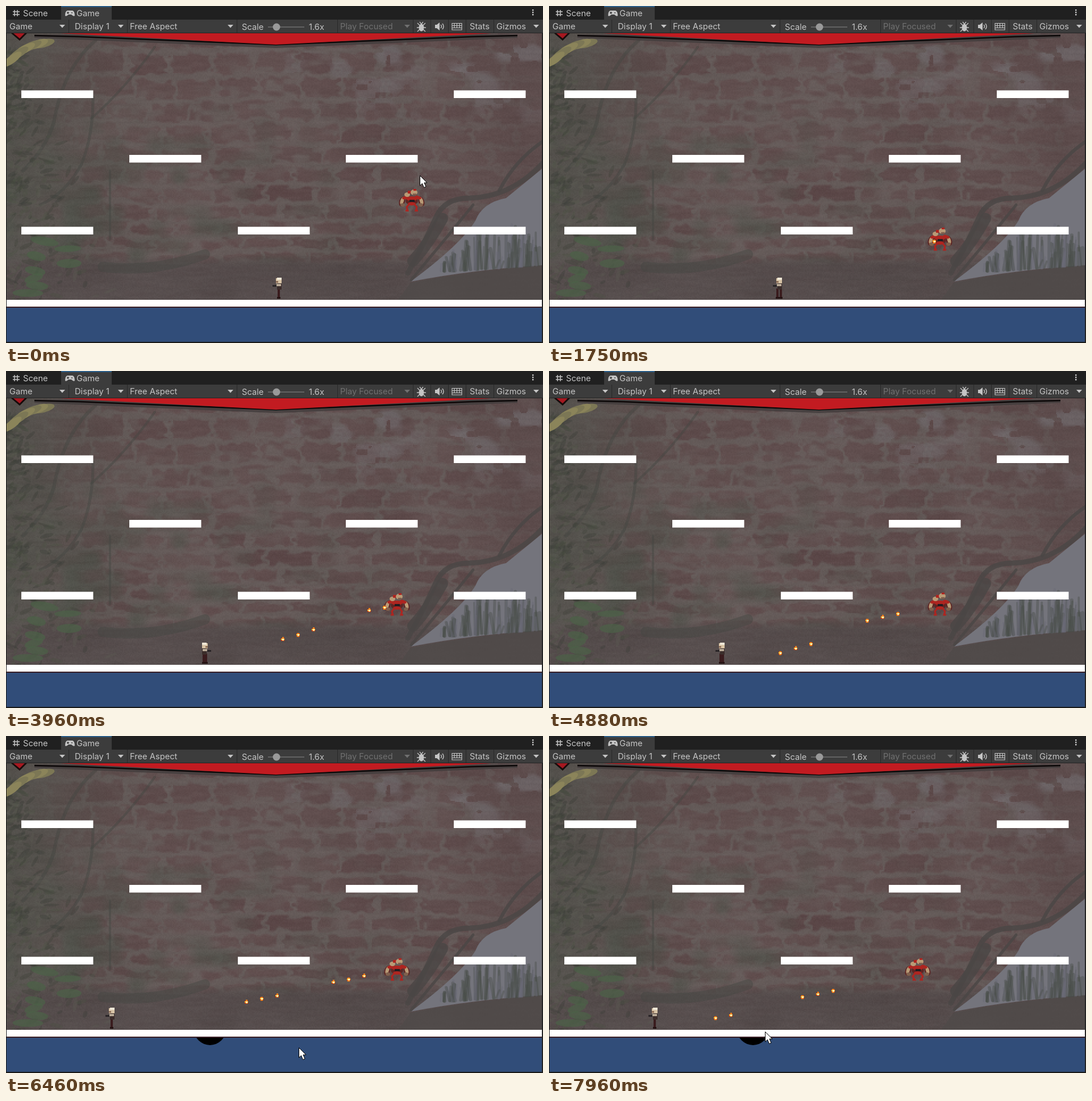
These frames come from a looping animation (945x593 px, 8 s). An HTML page with a canvas:

```html
<!DOCTYPE html>
<html lang="en">
<head>
<meta charset="utf-8">
<title>Game view</title>
<style>
html, body { margin: 0; width: 100%; height: 100%; overflow: hidden; background: #202020; }
canvas { display: block; }
</style>
</head>
<body>
<canvas id="stage" width="945" height="593"></canvas>
<script>
const LOOP = 8000, TOP = 48, W = 945, H = 593, SIDES = [-1, 1];
const stage = document.getElementById('stage').getContext('2d');
const clamp = (v, a = 0, b = 1) => Math.min(b, Math.max(a, v));
const mix = (a, b, k) => a + (b - a) * k;
const mixColor = (a, b, k) => a.map((v, i) => mix(v, b[i], k));

function makeCanvas(w, h) {
  const c = document.createElement('canvas');
  c.width = w; c.height = h;
  return c;
}
function hash(x, y) {
  let h = Math.imul(x, 374761393) + Math.imul(y, 668265263) | 0;
  h = Math.imul(h ^ h >>> 13, 1274126177);
  return ((h ^ h >>> 16) >>> 0) / 4294967296;
}
function noise(x, y) {
  const ix = Math.floor(x), iy = Math.floor(y);
  const ease = k => k * k * (3 - 2 * k), fx = ease(x - ix), fy = ease(y - iy);
  return mix(mix(hash(ix, iy), hash(ix + 1, iy), fx),
             mix(hash(ix, iy + 1), hash(ix + 1, iy + 1), fx), fy);
}
let seed = 7;
const random = (a = 0, b = 1) => mix(a, b, hash(seed++, 91));

function rect(g, color, x, y, w, h) {
  g.fillStyle = color;
  g.fillRect(x, y, w, h);
}
function fill(g, color, d) {
  g.fillStyle = color;
  g.fill(new Path2D(d));
}
function stroke(g, color, width, d) {
  g.strokeStyle = color;
  g.lineWidth = width;
  g.stroke(new Path2D(d));
}
function oval(g, color, x, y, rx, ry, angle = 0) {
  g.fillStyle = color;
  g.beginPath();
  g.ellipse(x, y, rx, ry, angle, 0, Math.PI * 2);
  g.fill();
}

// Courses get flatter towards the floor: top of course n = 30 + 48n - 1.05n²
const courseAt = y => (48 - Math.sqrt(48 * 48 - 4.2 * (y - 30))) / 2.1;

function wallColor(x, y) {
  const wx = x + (noise(x / 9, y / 8) - .5) * 18;
  const wy = y + (noise(x / 12 + 40, y / 7) - .5) * 10 + (noise(x / 90, 3) - .5) * 10;
  const dirt = noise(x / 75 + 9, y / 65), patch = noise(x / 16 + 80, y / 11);
  const left = clamp((330 - x) / 330), right = clamp((x - 720) / 200);
  let color = mixColor([96, 83, 82], [84, 82, 77], left);
  color = mixColor(color, [93, 77, 77], right);

  const course = courseAt(wy), row = Math.floor(course);
  const height = 48 - 1.05 * (2 * row + 1), width = 72 + 26 * hash(row, 5);
  const across = (wx + hash(row, 8) * 90) / width, cell = Math.floor(across);
  const fromEdge = (k, size) => Math.min(k, 1 - k) * size;
  const edge = Math.min(fromEdge(course - row, height), fromEdge(across - cell, width));
  const brick = mixColor([98, 78, 78], [91, 69, 70], hash(cell, row));
  const worn = clamp((patch - .5) * 3) * clamp(dirt * 1.8 - .4);
  const bricks = clamp((x - 25) / 200, .1) * clamp((980 - x) / 220) * clamp(1.3 - dirt * .7) * .75;
  const joint = clamp((6 + patch * 4 - edge) / 5);
  color = mixColor(color, mixColor(brick, [103, 94, 92], Math.max(joint, worn)), bricks);

  const green = clamp((noise(x / 38 + 31, y / 30 + 6) - .42) * 2) * clamp((760 - x) / 450) * clamp((y - 130) / 200);
  color = mixColor(color, [76, 80, 72], green * .7);
  const chalk = clamp((noise(x / 42 + 3, y / 28 + 5) - .58) * 5) * clamp((x - 380) / 300) * clamp((230 - y) / 110);
  if (patch > .42) color = mixColor(color, [114, 108, 111], chalk * .65);
  color = mixColor(color, [84, 75, 75], clamp((y - 438) / 18) * .9);
  const tone = (dirt - .5) * 7 + (noise(x / 28, y / 4) - .5) * 5 + (hash(x, y) - .5) * 5;
  return color.map(v => v + tone);
}

function paintWall(g) {
  const w = 473, h = 242, small = makeCanvas(w, h), s = small.getContext('2d');
  const image = s.createImageData(w, h);
  for (let y = 0, i = 0; y < h; y++)
    for (let x = 0; x < w; x++, i += 4) {
      image.data.set(wallColor(x * 2, y * 2 + TOP), i);
      image.data[i + 3] = 255;
    }
  s.putImageData(image, 0, 0);
  g.imageSmoothingEnabled = false;
  g.drawImage(small, 0, TOP, w * 2, h * 2);
}

function paintPlants(g) {
  g.save();
  g.beginPath();
  g.rect(0, TOP, W, 482);
  g.clip();
  g.lineCap = g.lineJoin = 'round';

  // clearing with hanging grass, lower right
  fill(g, '#74747c', 'M945 285 L880 338 Q838 346 826 378 Q800 420 712 485 Q820 464 945 456Z');
  for (let i = 0; i < 110; i++) {
    const x = random(760, 942), base = 470 - (x - 712) * .06;
    const tint = i % 3 ? '72,78,72' : '104,105,118';
    stroke(g, `rgba(${tint},.4)`, random(2, 7), `M${x} ${base} l${random(-6, 6)} ${-random(10, clamp((x - 750) * .9, 12, 75))}`);
  }
  fill(g, 'rgba(79,74,73,.8)', 'M712 487 Q820 466 945 457 V517 H690Z');
  const bark = 'rgba(74,71,69,.8)';
  stroke(g, bark, 6, 'M945 238 Q895 272 868 325');
  stroke(g, bark, 9, 'M945 276 Q890 336 815 338 Q772 338 757 371 Q735 420 707 470');
  stroke(g, bark, 20, 'M768 374 Q744 418 716 449');
  stroke(g, bark, 5, 'M822 350 Q790 390 713 482');

  // vines and low branch
  const vine = 'rgba(68,69,64,.45)';
  stroke(g, vine, 6, 'M158 60 Q105 105 87 190 Q80 240 30 290');
  stroke(g, vine, 5, 'M153 160 Q154 225 133 278 Q105 330 60 350');
  stroke(g, vine, 4, 'M262 72 Q210 145 150 198 M183 290 V410');
  stroke(g, vine, 18, 'M170 459 Q260 470 350 437');

  const tints = ['62,66,58', '76,83,69', '57,60,54', '91,93,82'];
  for (let i = 0; i < 300; i++) {
    const y = random(75, 525), reach = 35 + clamp((y - 90) / 360) * 145;
    oval(g, `rgba(${tints[i % 4]},.35)`, reach * random() * random(.3, 1.1), y, random(4, 14), random(2, 4), random(-1.4, .6));
  }
  for (let i = 0; i < 8; i++)
    oval(g, 'rgba(76,97,72,.7)', random(35, 155), 414 + i * 13, random(15, 28), random(5, 8), random(-.4, .3));
  for (let i = 0; i < 6; i++)
    oval(g, i % 2 ? '#8b845a' : '#7c7755', 66 - i * 11, 66 + i * i * 1.1, 20, 7, -.25 - i * .08);
  g.restore();
}

function paintHud(g) {
  fill(g, 'rgba(68,62,62,.85)', 'M50 50 H900 V56 L475 74 50 56Z');
  stroke(g, '#0c0808', 2.5, 'M50 52 L130 54 475 68 820 54 900 52');
  fill(g, '#c21b21', 'M95 48 H855 L475 68Z');
  fill(g, '#170b0b', 'M9 48 H37 L24 61Z');
  fill(g, '#a51820', 'M13 48 H33 L24 57Z');

  const row = (y, columns) => columns.forEach(i => rect(g, '#fff', Math.round(27 + i * 190.3), y, 126.5, 13.5));
  row(148.5, [0, 4]);
  row(262, [1, 3]);
  row(388.5, [0, 2, 4]);
  rect(g, '#fff', 0, 517, W, 12);
  rect(g, '#3a2026', 0, 529, W, 2);
  rect(g, '#314d79', 0, 531, W, 60);
  rect(g, '#191919', 0, 591, W, 2);
  rect(g, '#1d1d1d', 0, TOP, 1, 545);
  rect(g, '#242424', 943, TOP, 2, 545);
}

function paintToolbar(g) {
  const ink = '#c4c4c4', faint = '#707070';
  const label = (text, x, y = 41, color = ink) => {
    g.font = '14.7px Inter, sans-serif';
    g.fillStyle = color;
    g.fillText(text, x, y);
  };
  const arrow = (x, color = ink) => fill(g, color, `M${x} 33 h10 l-5 5.5Z`);
  const divider = x => rect(g, '#292929', x, 24, 1, 23);
  rect(g, '#202020', 0, 0, W, 24);
  rect(g, '#3c3c3c', 0, 24, W, 23);
  rect(g, '#3c3c3c', 97, 0, 89, 24);
  rect(g, '#2c5d87', 97, 0, 89, 2);
  rect(g, '#242424', 0, 47, W, 1);
  [110, 213, 406, 583, 858].forEach(divider);
  for (let i = 0; i < 4; i++) divider(716 + i * 31.3 | 0);

  label('Scene', 30, 17.5);
  label('Game', 124, 17.5);
  label('Game', 6);
  label('Display 1', 121);
  label('Free Aspect', 218);
  label('Scale', 415, 42);
  label('1.6x', 533, 42);
  label('Play Focused', 588, 41, faint);
  label('Stats', 816);
  label('Gizmos', 863);
  [94, 197, 390, 928].forEach(x => arrow(x));
  arrow(701, faint);

  // tab icons and menu dots
  stroke(g, ink, 1.5, 'M15 7 V18 M20 7 V18 M12 10 H24 M12 15 H24');
  fill(g, ink, 'M108 8 H117 Q121 9 121 17 Q119 19 115 15 H110 Q106 19 104 17 Q104 9 108 8Z');
  stroke(g, '#3c3c3c', 1.5, 'M107 12 h4 M109 10 v4 M115 12 h2');
  for (let i = 0; i < 3; i++) rect(g, ink, 926, 6 + i * 4, 2.5, 2.5);

  // slider, bug, speaker, keyboard
  rect(g, '#626262', 461, 36, 64, 2);
  oval(g, '#999', 476, 37, 6.5, 6.5);
  oval(g, ink, 731, 38, 4.5, 6.5);
  stroke(g, ink, 1.3, 'M724 30 L728 34 M738 30 L734 34 M723 38 H739 M724 45 L728 41 M738 45 L734 41 M728 28 L731 32 L734 28');
  fill(g, ink, 'M755 33 h3 l5 -4 v14 l-5 -4 h-3Z');
  stroke(g, ink, 1.4, 'M765 33 Q768 36 765 39 M768 31 Q772 36 768 41');
  stroke(g, ink, 1.2, 'M785 30.5 H802 V42 H785Z M785 34.5 H802 M785 38.5 H802 M789 31 V38 M793.5 31 V38 M798 31 V38');
}

// Runs a painter around a snapped position, optionally mirrored
function place(x, y, paint, flip = 1) {
  stage.save();
  stage.translate(Math.round(x), Math.round(y));
  stage.scale(flip, 1);
  paint((...box) => rect(stage, ...box));
  stage.restore();
}

// Piecewise linear motion through [time, ...values]
function along(keys, t) {
  const next = keys.findIndex(k => k[0] > t);
  if (next <= 0) return keys.at(next).slice(1);
  const [t0, ...a] = keys[next - 1], [t1, ...b] = keys[next];
  return mixColor(a, b, (t - t0) / (t1 - t0));
}

const WALK = [[1095, 480], [2165, 357], [2520, 398], [3375, 300], [3525, 300], [4218, 380], [5900, 186]];
const playerX = t => along(WALK, t)[0];

function drawPlayer(t) {
  const step = playerX(t + 20) - playerX(t - 20);
  const stride = step ? Math.round(Math.sin(t / 75) * 3) : 0;
  place(playerX(t), 478, box => {
    for (const s of SIDES) {
      box('#3a1c1e', s * stride - 2, 19, 4, 16);
      box('#251313', s * stride - 3, 34, 6, 3);
    }
    box('#3b2d2b', -3, 9, 8, 12);
    box('#b9aa97', -4, 11, 8, 4);
    box('#282426', -11, 13, 7, 3);
    box('#d8c4a6', -5, 1, 10, 9);
    box('#f0e8d7', -3, 0, 8, 4);
    box('#8e6f58', -5, 6, 4, 3);
  }, step > 0 ? -1 : 1);
}

function drawBoss(t) {
  const fall = clamp(t / 550), advance = clamp((t - 7600) / 360);
  const stride = fall < 1 || advance ? Math.sin(t / 80) * 2 : 0;
  const sway = Math.round(Math.sin(t / 160));
  const red = '#ae2520', dark = '#5e2523', skin = '#b99a76', shade = '#80604d';
  place(mix(714, 688, fall) - advance * 39, mix(342, 411, fall * fall), box => {
    for (const s of SIDES) {
      const x = s * (17 + sway);
      oval(stage, dark, x, 2, 5, 9, s * -.3);
      oval(stage, skin, x, 1, 3, 7, s * -.3);
      oval(stage, shade, x - s, 8, 4, 3);
      oval(stage, red, s * 11, -5, 6, 3, s * .3);
      stroke(stage, red, 3, `M${s * 5} 7 L${s * 9} 12 L${s * (7 + stride)} 18 h${s * 4}`);
    }
    oval(stage, dark, 0, 1, 11, 7);
    oval(stage, red, 0, -3, 10, 4);
    oval(stage, red, 0, 6, 7, 3);
    oval(stage, skin, -8, -10, 5, 4);
    box('#211e22', -4, -1, 9, 4);
    box(red, -7, -17, 8, 5);
    oval(stage, skin, 4, -14 + sway, 6, 5);
    box(red, 3, -20 + sway, 5, 3);
    box(shade, 2, -12 + sway, 6, 3);
  });
}

// Three volleys of three; each volley is aimed at where the player stood at its first shot
const SPEED = .0865, BLAST_AGE = 3750;
const volleyStart = v => 1690 + v * 1765;

function blastDisc() {
  oval(stage, '#000', 359, 515.5, 28.4, 28.4);
}
function drawShots(t) {
  for (let v = 0; v < 3; v++)
    for (let i = 0; i < 3; i++) {
      const age = t - volleyStart(v) - i * 315;
      const spent = v === 0 ? age > BLAST_AGE : v === 1 && i === 2 && t > 7500;
      if (v === 0 && spent && age < BLAST_AGE + 60) blastDisc();
      if (age < 0 || spent) continue;
      const slope = 83 / (683 - playerX(volleyStart(v))), run = age * SPEED;
      const tall = Math.floor(t / 120 + i) % 2;
      place(683 - run, 412 + run * slope, box => {
        box('#d53b16', -3, -2, 6, 5);
        box('#ee821e', tall - 2, -3 - tall, 4 - tall, 7);
        box('#ffc72e', -3, -1, 6, 2);
        box('#fff8bb', -1, -1, 3, 3);
      });
    }
}
// The strip below the floor is never cleared, so the blast leaves its mark there
function drawScorch(t) {
  if (t < volleyStart(0) + BLAST_AGE) return;
  stage.save();
  stage.beginPath();
  stage.rect(300, 531, 120, 30);
  stage.clip();
  blastDisc();
  stage.restore();
}

const POINTER_OUT = [[0, 728, 298], [700, 898, 405], [960, 860, 422], [1300, 892, 440], [1660, 880, 470]];
const POINTER_BACK = [[5480, 940, 440], [5880, 786, 476], [6400, 540, 547], [6800, 375, 555], [7040, 370, 521], [7960, 380, 520]];
const ARROW = new Path2D('M.5 .5 V18 L4.5 14.3 7.5 21.5 11 20 8 13 H13Z');

function drawPointer(t) {
  if (t > 1660 && t < 5480) return;
  const [x, y] = along(t < 3000 ? POINTER_OUT : POINTER_BACK, t);
  place(x, y, () => {
    stage.fillStyle = '#fff';
    stage.fill(ARROW);
    stroke(stage, '#000', 1, ARROW);
  });
}

const scenery = makeCanvas(W, H);
[paintWall, paintPlants, paintHud, paintToolbar].forEach(paint => paint(scenery.getContext('2d')));

function frame() {
  const t = performance.now() % LOOP;
  stage.drawImage(scenery, 0, 0);
  drawScorch(t);
  drawBoss(t);
  drawPlayer(t);
  drawShots(t);
  drawPointer(t);
  requestAnimationFrame(frame);
}
frame();
</script>
</body>
</html>
```
